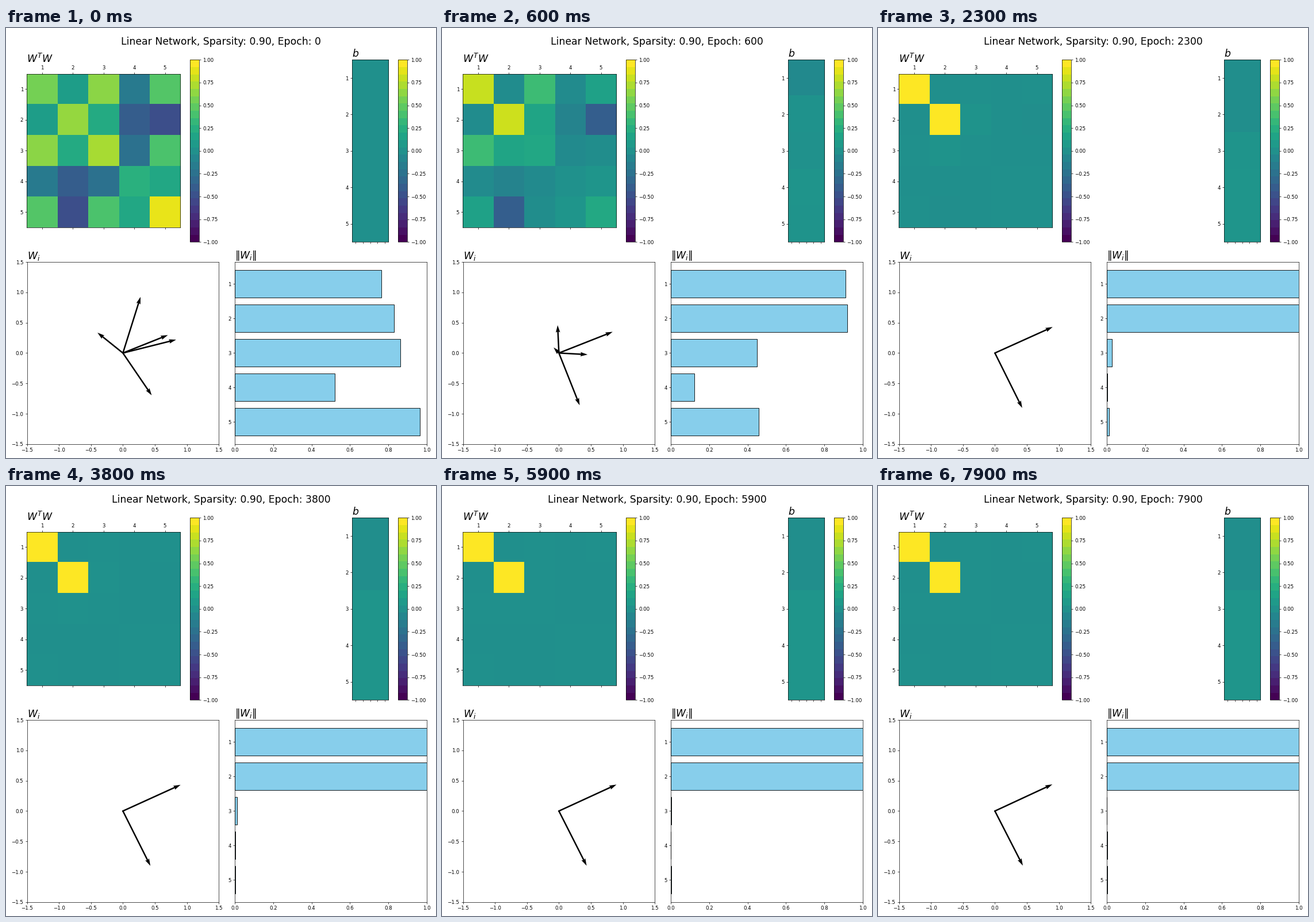
Recreate the animation shown at these times as a matplotlib script. Size 748 by 748 pixels, loop 8 s.

```python
import numpy as np
import matplotlib.pyplot as plt
from matplotlib.animation import FuncAnimation

SIZE = 748
FRAMES = 80
LABELS = ["1", "2", "3", "4", "5"]

# One entry per feature: the first two survive training, the rest die out.
ALIVE = np.array([1, 1, 0, 0, 0])
TAU = np.array([6.1, 6.95, 8.25, 4.58, 7.47])
POWER = np.where(ALIVE, 1.9, 1.35)
START_NORM = np.array([.763, .829, .861, .520, .965])
START_ANGLE = np.array([22.8, -57.1, 14.8, 139.8, 73.4])
END_ANGLE = np.array([25.15, -64.98, -50.5, 135, 113])
ANGLE_KICK = np.array([-7.4, -32.5, 52.6, -24, -7])
END_BIAS = np.where(ALIVE, -.013, .04)
BIAS_KICK = np.array([-.18, .11, -.03, .03, .03])
DRIFT = .0115  # degrees per frame

rng = np.random.default_rng(4)
NOISE = rng.exponential(.003, (FRAMES, 5)) * (1 - ALIVE)


def state(i):
    """Weight vectors and biases after i steps of training."""
    left = np.exp(-(i / TAU) ** POWER)

    def settle(start, end, kick=0):
        return end + (start - end) * left + kick * left * (1 - left)

    norm = settle(START_NORM, ALIVE)
    if i > 20:
        norm = norm + NOISE[i]
    angle = np.radians(settle(START_ANGLE, END_ANGLE + DRIFT * i, ANGLE_KICK))
    w = norm[:, None] * np.column_stack([np.cos(angle), np.sin(angle)])
    return w, norm, settle(0, END_BIAS, BIAS_KICK)


fig = plt.figure(figsize=(12, 12), dpi=SIZE / 12 + 1e-5)


def panel(x0, y0, x1, y1):
    """Axes from pixel edges, measured from the top left."""
    return fig.add_axes([x0 / SIZE, 1 - y1 / SIZE,
                         (x1 - x0) / SIZE, (y1 - y0) / SIZE])


def title(ax, text):
    ax.set_title(text, fontsize=20, loc="left")


def colorbar(x0):
    scale = plt.cm.ScalarMappable(plt.Normalize(-1, 1),
                                  plt.get_cmap("viridis", 25))
    fig.colorbar(scale, cax=panel(x0, 55.3, x0 + 15.85, 372.4),
                 ticks=np.linspace(-1, 1, 9))


head = fig.suptitle("", fontsize=20)

gram_ax = panel(36.2, 79.8, 303.2, 346.8)
gram = gram_ax.matshow(np.zeros((5, 5)), cmap="viridis", vmin=-1, vmax=1)
gram_ax.set_xticks(range(5), LABELS)
gram_ax.set_yticks(range(5), LABELS)
title(gram_ax, "$W^TW$")
colorbar(320.4)

bias_ax = panel(602, 55.3, 665.4, 372.4)
bias = bias_ax.imshow(np.zeros((5, 1)), cmap="viridis", vmin=-1, vmax=1,
                      aspect="auto")
bias_ax.set_xticks(np.linspace(-.4, .4, 5), [""] * 5)
bias_ax.set_yticks(range(5), LABELS)
title(bias_ax, "$b$")
colorbar(682.2)

arrow_ax = panel(36.5, 407, 370.2, 723.8)
zeros = np.zeros(5)
arrows = arrow_ax.quiver(zeros, zeros, *state(0)[0].T,
                         angles="xy", scale_units="xy", scale=1)
ticks = np.linspace(-1.5, 1.5, 7)
arrow_ax.set(xlim=(-1.5, 1.5), ylim=(-1.5, 1.5), xticks=ticks, yticks=ticks)
title(arrow_ax, "$W_i$")

norm_ax = panel(398, 407, 732, 723.8)
bars = norm_ax.barh(range(1, 6), np.ones(5), color="skyblue",
                    edgecolor="black")
norm_ax.set(xlim=(0, 1), ylim=(5.64, .36), yticks=range(1, 6))
title(norm_ax, r"$\|W_i\|$")


def update(i):
    w, norm, b = state(i)
    head.set_text(f"Linear Network, Sparsity: 0.90, Epoch: {100 * i}")
    gram.set_data(w @ w.T)
    bias.set_data(b[:, None])
    arrows.set_UVC(*w.T)
    for bar, length in zip(bars, norm):
        bar.set_width(length)
    return head, gram, bias, arrows, *bars


anim = FuncAnimation(fig, update, frames=FRAMES, interval=100, repeat=True,
                     repeat_delay=0, blit=False)
plt.show()
```
